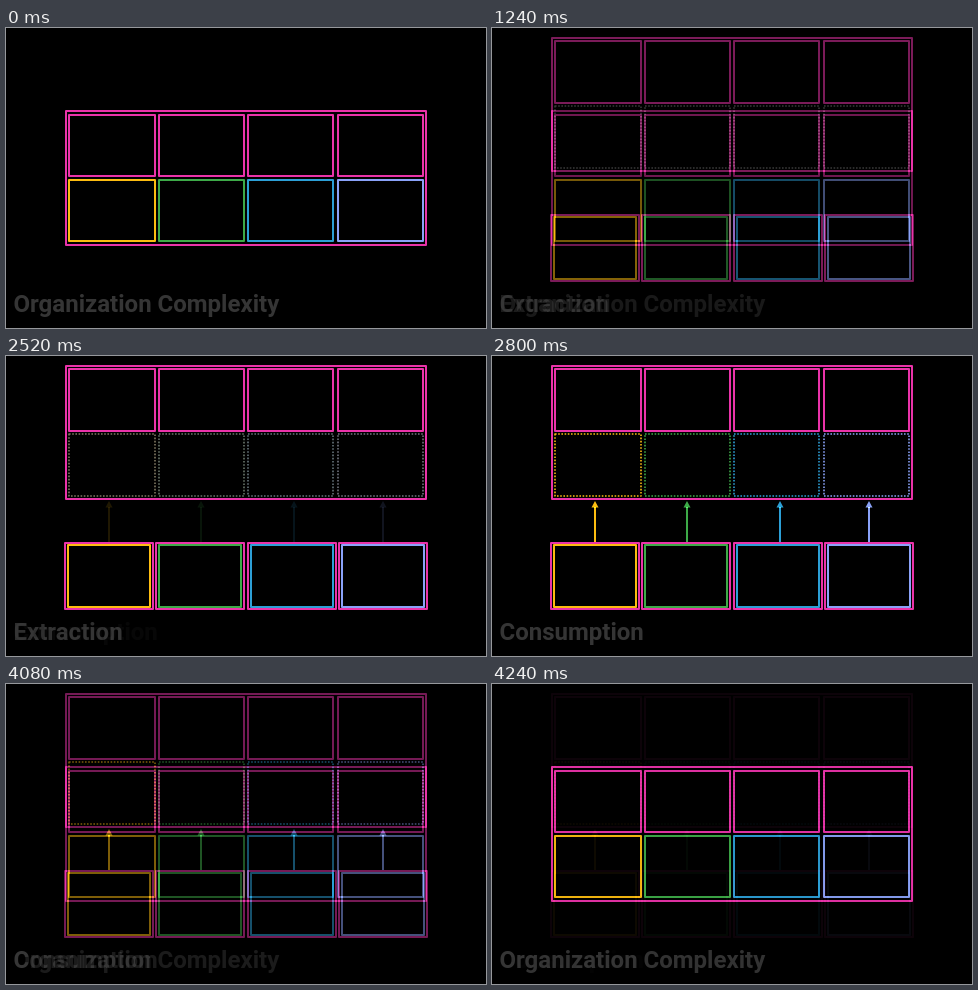
An HTML page with a canvas for the animation above (4320 ms loop, 480 by 300 pixels).

```html
<!DOCTYPE html>
<html>
<head>
<meta charset="utf-8">
<style>
html, body { margin: 0; height: 100%; overflow: hidden; background: #000; }
canvas { display: block; }
</style>
</head>
<body>
<canvas id="stage" width="480" height="300"></canvas>
<script>
const ctx = document.getElementById('stage').getContext('2d');
const LOOP = 4320, STEP = 40;
const PINK = '#ea33a9', GRAY = '#6c6c6c';
const COLORS = ['#fcbc10', '#3daa48', '#2c9fd6', '#8aa2f8'];
const TITLES = ['Organization Complexity', 'Extraction', 'Consumption'];
const CELL_X = [63, 153, 242, 332];
const SHELL_X = [59, 150, 242, 333];
const CORE_X = [62, 153, 245, 336];
const ARROW_X = [103, 195, 288, 377];
// Start and duration of each cross-fade
const FADES = [[1040, 380], [2480, 320], [3900, 360]];

const clamp = v => Math.max(0, Math.min(1, v));

function box(x, y, w, h, color) {
  ctx.strokeStyle = color;
  ctx.strokeRect(x, y, w, h);
}

function cells(y, h, color) {
  CELL_X.forEach((x, i) => box(x, y, i ? 85 : 86, h, color(i)));
}

function arrow(x, color) {
  ctx.fillStyle = color;
  ctx.fillRect(x - 1, 151, 2, 35);
  ctx.beginPath();
  ctx.moveTo(x, 145);
  ctx.lineTo(x + 3.5, 151.5);
  ctx.lineTo(x - 3.5, 151.5);
  ctx.fill();
}

function whole() {
  box(60, 83, 360, 134, PINK);
  cells(87, 61, () => PINK);
  cells(152, 61, i => COLORS[i]);
}

function split(connected) {
  box(60, 10, 360, 133, PINK);
  cells(13, 62, () => PINK);
  ctx.lineWidth = 1.6;
  ctx.setLineDash([1.6, 1.6]);
  cells(78, 62, i => connected ? COLORS[i] : GRAY);
  ctx.setLineDash([]);
  ctx.lineWidth = 2;
  COLORS.forEach((color, i) => {
    box(SHELL_X[i], 187, 88, 66, PINK);
    box(CORE_X[i], 189, 82, 62, color);
    if (connected) arrow(ARROW_X[i], color);
  });
}

function scene(i, alpha) {
  ctx.globalAlpha = alpha;
  if (i === 0) whole();
  else split(i === 2);
  ctx.fillStyle = '#353535';
  ctx.fillText(TITLES[i], 7.5, 284);
}

function draw(now) {
  // The last fade step holds until the loop restarts
  const t = Math.min(Math.floor(now % LOOP / STEP) * STEP, 4240);
  const pos = FADES.reduce((sum, [start, span]) => sum + clamp((t - start) / span), 0);
  ctx.globalCompositeOperation = 'source-over';
  ctx.globalAlpha = 1;
  ctx.fillStyle = '#000';
  ctx.fillRect(0, 0, 480, 300);
  ctx.globalCompositeOperation = 'lighter';
  ctx.lineWidth = 2;
  ctx.lineJoin = 'round';
  ctx.font = 'bold 24px Roboto, sans-serif';
  for (let i = 0; i <= 3; i++) {
    const alpha = 1 - Math.abs(pos - i);
    if (alpha > 0) scene(i % 3, alpha);
  }
}

const begin = performance.now();
function tick() {
  draw(performance.now() - begin);
  requestAnimationFrame(tick);
}
tick();
</script>
</body>
</html>
```
